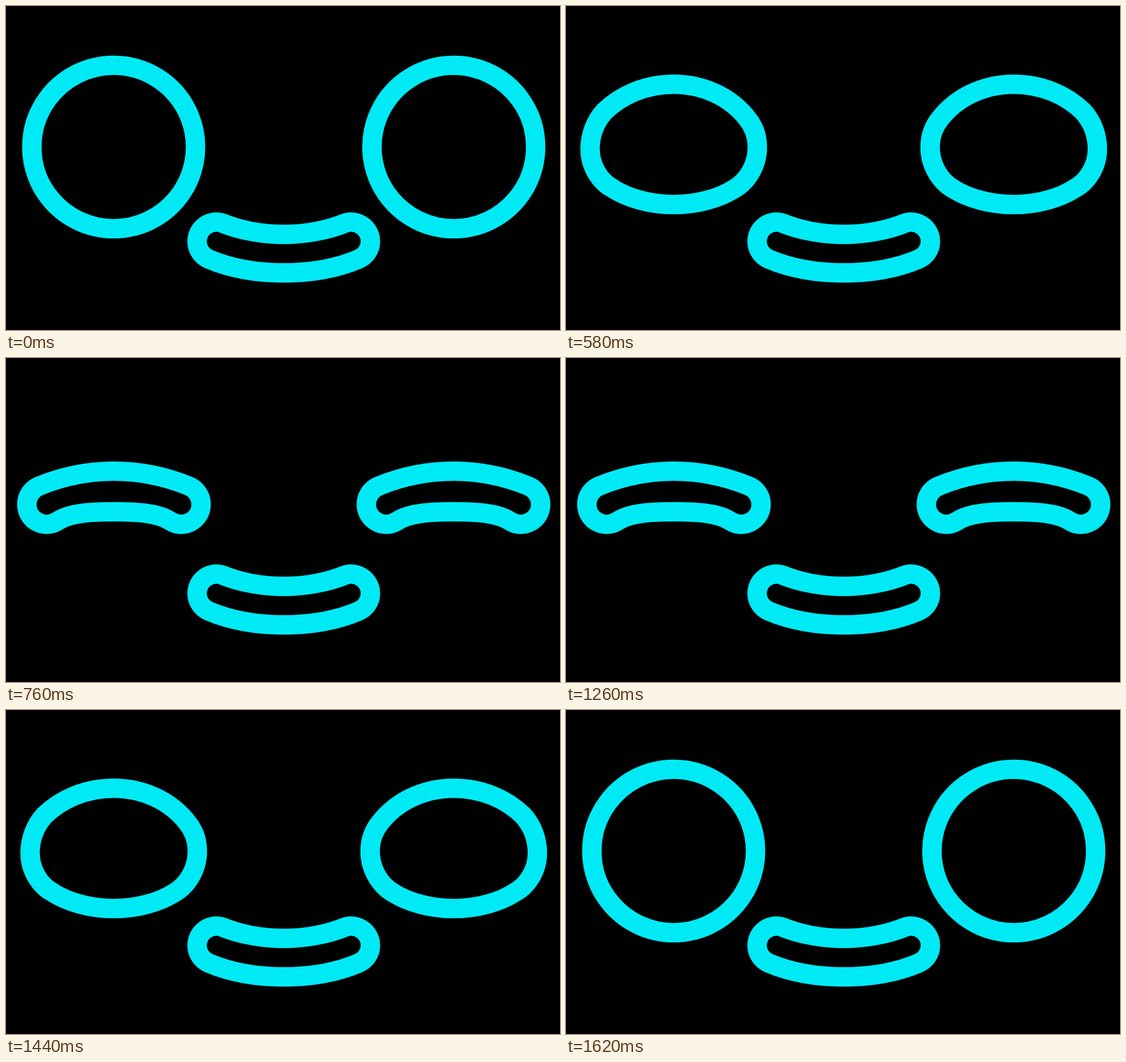
Recreate the animation shown at these times as an HTML page with a canvas. Size 978 px wide and 573 px high, loop 4620 ms.

```html
<!DOCTYPE html>
<html lang="en">
<head>
<meta charset="utf-8">
<title>Blinking face</title>
<style>
  html, body { margin: 0; width: 100%; height: 100%; overflow: hidden; background: #000; }
  canvas { display: block; }
</style>
</head>
<body>
<canvas id="stage" width="978" height="573"></canvas>
<script>
const ctx = document.getElementById('stage').getContext('2d');
const LOOP = 4620;
const MIRROR_WIDTH = 980.6;
const CLOSING = [500, 580, 670, 760];
const OPENING = [1350, 1440, 1530, 1620];

const radians = degrees => degrees * Math.PI / 180;
const lerp = (a, b, k) => a + (b - a) * k;
const arcHandle = (r, degrees) => 4 / 3 * r * Math.tan(radians(degrees) / 4);

// Node with its two Bezier handles: [handle in, point, handle out].
function node(x, y, degrees, before, after) {
  const dx = Math.cos(radians(degrees)), dy = Math.sin(radians(degrees));
  return [[x - dx * before, y - dy * before], [x, y], [x + dx * after, y + dy * after]];
}

// Completes an outline from its right half.
function symmetric(half) {
  const axis = half[0][1][0];
  const flipped = half.slice(1, -1).reverse()
    .map(handles => handles.map(([x, y]) => [2 * axis - x, y]).reverse());
  return half.concat(flipped);
}

function circle(cx, cy, r, angles) {
  const n = angles.length;
  const handle = (from, to) => arcHandle(r, (to - from + 360) % 360);
  return angles.map((deg, i) => node(
    cx + r * Math.cos(radians(deg)), cy + r * Math.sin(radians(deg)), deg + 90,
    handle(angles[(i + n - 1) % n], deg), handle(deg, angles[(i + 1) % n])
  ));
}

// A bent capsule: round caps joined by an outer and an inner curve.
function bean({ axis, outer, inner, reach, capY, r, shoulder, join, flip }) {
  const capNode = (deg, before, after) => node(
    axis + reach + r * Math.cos(radians(deg)), capY + flip * r * Math.sin(radians(deg)),
    flip * (deg + 90), before, after
  );
  const outerSpan = reach + r * Math.cos(radians(shoulder));
  const innerSpan = reach + r * Math.cos(radians(join));
  const upper = arcHandle(r, shoulder), lower = arcHandle(r, join);
  return symmetric([
    node(axis, outer, 0, 0.4 * outerSpan, 0.4 * outerSpan),
    capNode(-shoulder, 0.3 * outerSpan, upper),
    capNode(0, upper, lower),
    capNode(join, lower, 0.26 * innerSpan),
    node(axis, inner, 180, 0.4 * innerSpan, 0.4 * innerSpan)
  ]);
}

const openEye = circle(190.1, 249.4, 144.5, [-90, -26, -6, 40, 90, 140, 180, 216]);
const shutEye = bean({
  axis: 190.6, outer: 200.5, inner: 271.5, reach: 118.9,
  capY: 259, r: 35, shoulder: 68, join: 124, flip: 1
});
const mouth = bean({
  axis: 490.3, outer: 472, inner: 404, reach: 119,
  capY: 416.3, r: 34, shoulder: 67, join: 112, flip: -1
});

const mix = (from, to, k) => from.map((handles, i) =>
  handles.map((p, j) => p.map((v, axis) => lerp(v, to[i][j][axis], k))));

// The lids move in held steps along an ease-in-out curve.
function closedAmount(time) {
  const passed = starts => starts.filter(start => start <= time).length;
  const level = passed(CLOSING) - passed(OPENING);
  const u = Math.max(0, 0.285 * level - 0.172);
  return u * u * (3 - 2 * u);
}

function strokeOutline(nodes) {
  ctx.beginPath();
  ctx.moveTo(...nodes[0][1]);
  nodes.forEach(([, , out], i) => {
    const [handle, point] = nodes[(i + 1) % nodes.length];
    ctx.bezierCurveTo(...out, ...handle, ...point);
  });
  ctx.closePath();
  ctx.stroke();
}

function draw(time) {
  const eye = mix(openEye, shutEye, closedAmount(time));

  ctx.fillStyle = '#000';
  ctx.fillRect(0, 0, 978, 573);
  ctx.strokeStyle = '#00eaf6';
  ctx.lineWidth = 34.3;
  ctx.lineJoin = 'round';

  strokeOutline(mouth);
  strokeOutline(eye);
  ctx.save();
  ctx.translate(MIRROR_WIDTH, 0);
  ctx.scale(-1, 1);
  strokeOutline(eye);
  ctx.restore();
}

const began = performance.now();
function tick() {
  draw((performance.now() - began) % LOOP);
  requestAnimationFrame(tick);
}
tick();
</script>
</body>
</html>
```
